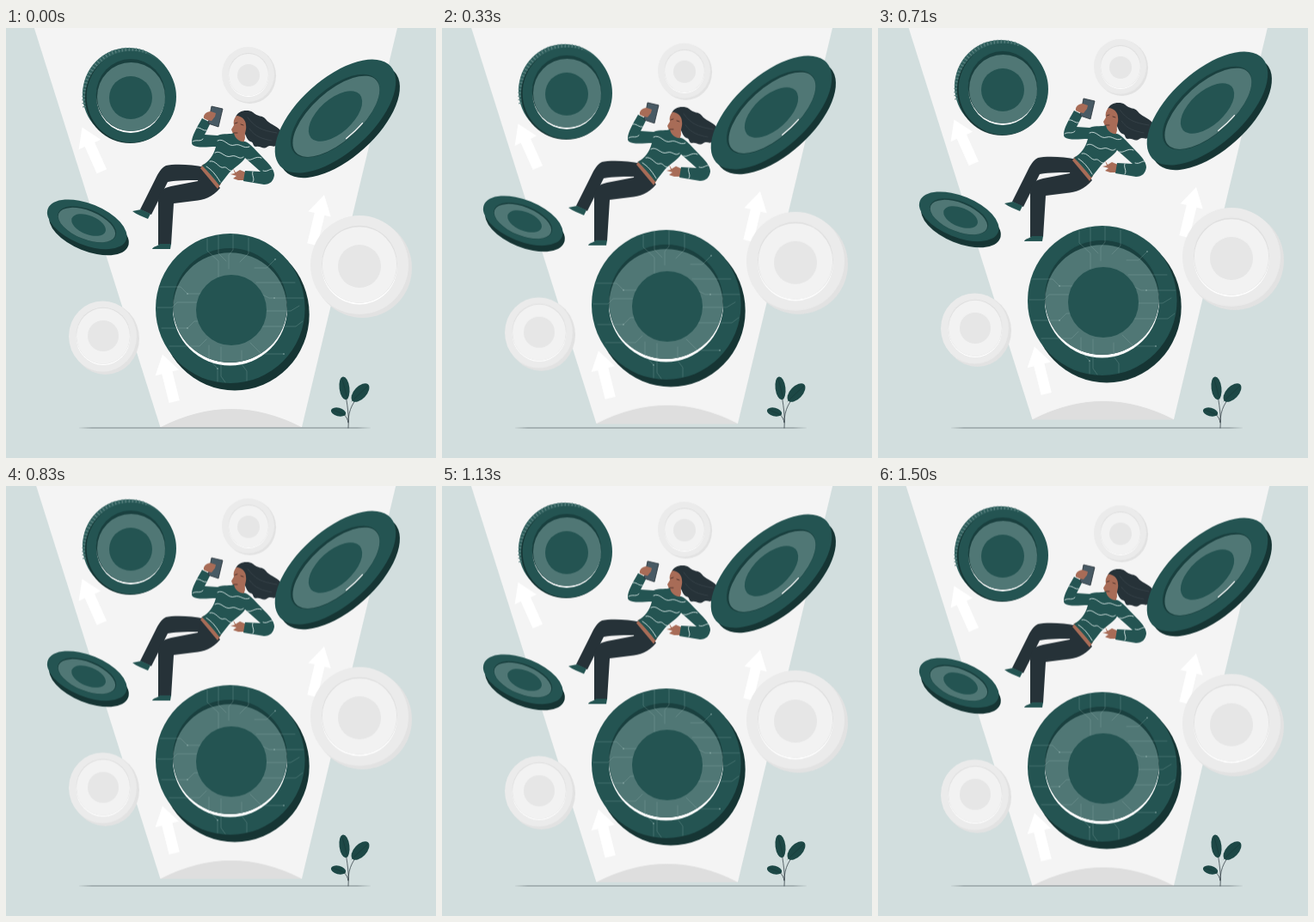
An HTML page without scripts that plays this animation: 500x500 px, repeating every 1.54 s.

```html
<!DOCTYPE html>
<html lang="en">
<head>
<meta charset="utf-8">
<title>Floating coins</title>
<style>
  html, body { margin: 0; width: 100%; height: 100%; overflow: hidden; background: #d2dede; }
  svg { display: block; width: 100%; height: 100%; }
  .float { animation: float 770ms linear -65ms infinite alternate; }
  @keyframes float {
    from { transform: translateY(.85px); }
    to { transform: translateY(-9.15px); }
  }
  .side { fill: #163534; }
  .rim { fill: #245452; }
  .face { fill: #507775; }
  .deep { fill: #1a403f; }
  .mark { fill: #245452; }
  .shine { fill: #fff; }
  .pale .side { fill: #e2e2e2; }
  .pale .rim { fill: #ebebeb; }
  .pale .face { fill: #f2f2f2; }
  .pale .deep { fill: #dfdfdf; }
  .pale .mark { fill: #e6e6e6; }
  .line { fill: none; stroke-linecap: round; stroke-linejoin: round; }
  .ink { fill: #263238; }
  .skin { fill: #a86c57; }
  .leaf { fill: #1d4846; }
</style>
</head>
<body>
<svg viewBox="0 0 500 500">
  <defs>
    <path id="arrow" d="M0 0 L13.500 21 L6 21 V54 H-6 V21 H-13.500Z" fill="#fff"/>
  </defs>

  <g class="float">
    <path d="M26.500-20 L179.400 464 H344 L459.800-20Z" fill="#f4f4f4"/>
    <path d="M179 464.500 Q262 421.500 344.500 464.500Z" fill="#dedede"/>
    <use href="#arrow" transform="translate(88.500 115.500) rotate(-24) scale(1.040)"/>
    <use href="#arrow" transform="translate(370 194) rotate(13.500) scale(1 1.100)"/>
    <use href="#arrow" transform="translate(182 379.500) rotate(-14) scale(1.050)"/>

    <g class="pale">
      <ellipse class="side" cx="283.500" cy="55.500" rx="30.500" ry="32.500"/>
      <ellipse class="rim" cx="281.500" cy="54" rx="30.500" ry="32"/>
      <ellipse class="shine" cx="282" cy="55" rx="23.500" ry="25"/>
      <ellipse class="deep" cx="282" cy="54" rx="23.500" ry="25"/>
      <ellipse class="face" cx="282" cy="54.500" rx="23" ry="24.500"/>
      <circle class="mark" cx="282" cy="55" r="13"/>
    </g>
    <g class="pale">
      <ellipse class="side" cx="414.500" cy="279" rx="57.500" ry="58"/>
      <ellipse class="rim" cx="411" cy="275.500" rx="57" ry="57.500"/>
      <ellipse class="shine" cx="411" cy="276.500" rx="44" ry="45"/>
      <ellipse class="deep" cx="411" cy="274.800" rx="44" ry="45"/>
      <ellipse class="face" cx="411" cy="275.500" rx="43.300" ry="44.300"/>
      <circle class="mark" cx="411" cy="277" r="25"/>
    </g>
    <g class="pale">
      <ellipse class="side" cx="115.500" cy="361" rx="39.500" ry="42"/>
      <ellipse class="rim" cx="112.500" cy="358.500" rx="39.500" ry="41"/>
      <ellipse class="shine" cx="113" cy="359" rx="31.500" ry="33"/>
      <ellipse class="deep" cx="113" cy="357.700" rx="31.500" ry="33"/>
      <ellipse class="face" cx="113" cy="358.300" rx="31" ry="32.500"/>
      <circle class="mark" cx="113" cy="358" r="18"/>
    </g>

    <g>
      <ellipse cx="142.500" cy="77" rx="53.500" ry="54" fill="#2f5f5d"/>
      <path class="line" d="M91.500 92 C86 62 106 24 143 25 Q155 25 165 30" stroke="#5b8280" stroke-width="4.500" stroke-dasharray="1.200 2.800" style="stroke-linecap:butt"/>
      <ellipse class="side" cx="144.500" cy="81" rx="52.500" ry="53"/>
      <ellipse class="rim" cx="145.800" cy="80" rx="52.200" ry="53.200"/>
      <ellipse class="shine" cx="145" cy="80" rx="39.800" ry="42"/>
      <ellipse class="deep" cx="145" cy="78" rx="40.300" ry="42"/>
      <ellipse class="face" cx="145.500" cy="80" rx="39.500" ry="40"/>
      <circle class="mark" cx="145" cy="81" r="25"/>
    </g>

    <g>
      <g transform="translate(96.500 235.500) rotate(22)"><ellipse class="side" rx="49" ry="24"/></g>
      <g transform="translate(94.200 228.300) rotate(22)">
        <ellipse class="rim" rx="49" ry="24"/>
        <ellipse class="deep" rx="36" ry="17.500"/>
        <ellipse class="face" cy=".8" rx="35.200" ry="16.500"/>
        <circle class="mark" transform="translate(2 0) scale(1 .52)" r="21"/>
      </g>
    </g>

    <g>
      <ellipse class="side" cx="266" cy="333" rx="86.700" ry="88.500"/>
      <ellipse class="rim" cx="260.800" cy="326" rx="86.800" ry="87"/>
      <ellipse class="shine" cx="260.500" cy="326" rx="66.500" ry="66.500"/>
      <ellipse class="deep" cx="260.500" cy="322.500" rx="66.500" ry="66.500"/>
      <ellipse class="face" cx="260.500" cy="325" rx="66" ry="63.800"/>
      <g class="line" stroke="#9dbab8" stroke-opacity=".38" stroke-width=".7">
        <path d="M234 245 V259 L247 271 V290 M247 240 V262 L256 271 M264 240 V258 L259 264 V280 M282 244 V262 L272 272"/>
        <path d="M179 301 H203 L211 309 H239 M176 325 H193 L199 319 H230 M181 349 H211 L219 341 H237 M190 370 H225 L233 362"/>
        <path d="M289 279 H303 L313 269 M291 296 H336 M296 309 L306 314 H346 M293 329 H331 L341 323 M288 347 H337 L345 341"/>
        <path d="M236 369 V385 L246 396 V411 M250 371 V405 L255 412 M274 375 V391 L280 399 V410 M284 366 L297 379 H323"/>
      </g>
      <g fill="#9dbab8" fill-opacity=".5">
        <circle cx="211" cy="309" r="1.100"/><circle cx="313" cy="269" r="1.100"/>
        <circle cx="312" cy="314" r="1.100"/><circle cx="246" cy="396" r="1.100"/>
        <circle cx="323" cy="379" r="1.100"/><circle cx="211" cy="349" r="1.100"/>
      </g>
      <circle class="mark" cx="262" cy="328" r="41"/>
    </g>

    <g class="person">
      <path class="ink" d="M267 104 C269 96 281 94 287 98 C293 104 298 101 302 106 C306 112 313 112 320 120 L315 136 C311 140 308 135 304 138 C299 142 296 137 291 138 C286 138 289 133 284 132 C278 129 279 119 267 104Z"/>
      <path class="line" d="M281 104 C290 116 297 119 315 122 M283 117 C290 127 299 129 309 131" stroke="#414c52" stroke-width=".6"/>
      <path class="skin" d="M268 102 C274 102 279 107 279 113 C280 119 277 121 278 128 L276 135 L264 129 C266 128 264 126 264 123 L262 118 L265 113 C264 109 265 105 268 102Z"/>
      <path class="line" d="M266 111 L269 110 M273 112 L276 113 M265 122 L269 122" stroke="#4b302b" stroke-width=".9"/>

      <path class="ink" d="M231 162 C215 158 194 158 186 160 C180 163 177 169 174 175 L156 211 L169 217 L188 179 C200 177 212 177 228 177 L241 180Z"/>
      <path class="rim" d="M157 211 L168 216 L165 222 C159 219 152 217 147 213Z"/>
      <path class="ink" d="M228 159 L249 186 C240 197 230 200 219 201 L195 204 L192 252 H177 V201 C177 191 182 186 192 184 L223 178Z"/>
      <path class="rim" d="M179 251 H192 L191 257 H170 C171 254 176 254 179 251Z"/>
      <path class="skin" d="M230 158 L250 181 L246 187 L226 163Z"/>

      <path class="skin" d="M264 163 L267 168 L272 165 L279 168 L278 177 L270 177 L264 175 L268 172 L261 170 L266 169Z"/>
      <path class="rim" d="M246 125 C253 122 262 124 265 122 C266 128 271 133 278 132 C284 134 292 144 298 150 C305 157 312 164 312 171 C311 178 307 182 300 182 L276 178 L278 166 L296 167 L278 151 C275 157 264 163 259 169 L248 183 C241 174 235 167 228 160 C236 155 241 149 244 138 C235 138 222 140 217 136 C213 130 223 114 228 105 L238 110 L231 124Z"/>
      <g class="line" stroke="#dbe8e7" stroke-width=".9">
        <path d="M222 116 C226 115 229 120 233 119 M217 132 C222 129 225 133 229 129"/>
        <path d="M246 131 C254 127 258 139 266 136 C273 134 276 141 283 138"/>
        <path d="M243 145 C250 141 254 152 262 149 C268 147 271 154 276 150"/>
        <path d="M237 155 C244 153 248 164 253 162 C257 161 258 166 262 166 M233 161 C239 165 243 169 249 179"/>
        <path d="M281 153 C286 155 290 148 297 151 M287 167 C285 171 290 175 287 179 M299 166 C304 168 307 163 310 164"/>
      </g>
      <path d="M239 91 L252 94 L247 115 L235 111Z" fill="#485a64" stroke="#263238" stroke-width=".8"/>
      <path class="skin" d="M230 105 C229 101 233 97 238 97 L244 99 L243 103 L239 108 L234 107Z"/>
    </g>

    <g>
      <g transform="translate(388 108.500) rotate(-42)"><ellipse class="side" rx="86" ry="42.500"/></g>
      <g transform="translate(383 102.500) rotate(-42)">
        <ellipse class="rim" rx="86.500" ry="42.500"/>
        <ellipse class="deep" cy="-.5" rx="64" ry="30.500"/>
        <ellipse class="face" cx=".5" cy=".8" rx="62.800" ry="28.700"/>
        <path class="line" d="M-8 27.800 Q6 28.500 18 27" stroke="#fff" stroke-width="1.200"/>
        <circle class="mark" transform="scale(1 .52)" r="38"/>
      </g>
    </g>
  </g>

  <path d="M83 465 L100 464.700 H408 L426 465 L408 465.300 H100Z" fill="#263238"/>
  <g class="plant">
    <path class="line" d="M398 465 C399 449 397 440 394 420 M398 458 C398 444 404 433 415 423 M398 459 C397 451 391 447 384 446" stroke="#263238" stroke-width=".7"/>
    <g class="leaf">
      <ellipse transform="translate(393.500 418.800) rotate(-7)" rx="5.900" ry="13.500"/>
      <ellipse transform="translate(412 424) rotate(43)" rx="7.200" ry="13.200"/>
      <ellipse transform="translate(386.500 446.500) rotate(14)" rx="8.800" ry="4.900"/>
    </g>
    <path class="line" d="M391 408 L397 431 M421 416 L402 434 M380 444 L395 450" stroke="#163534" stroke-width=".5"/>
  </g>
</svg>
</body>
</html>
```
